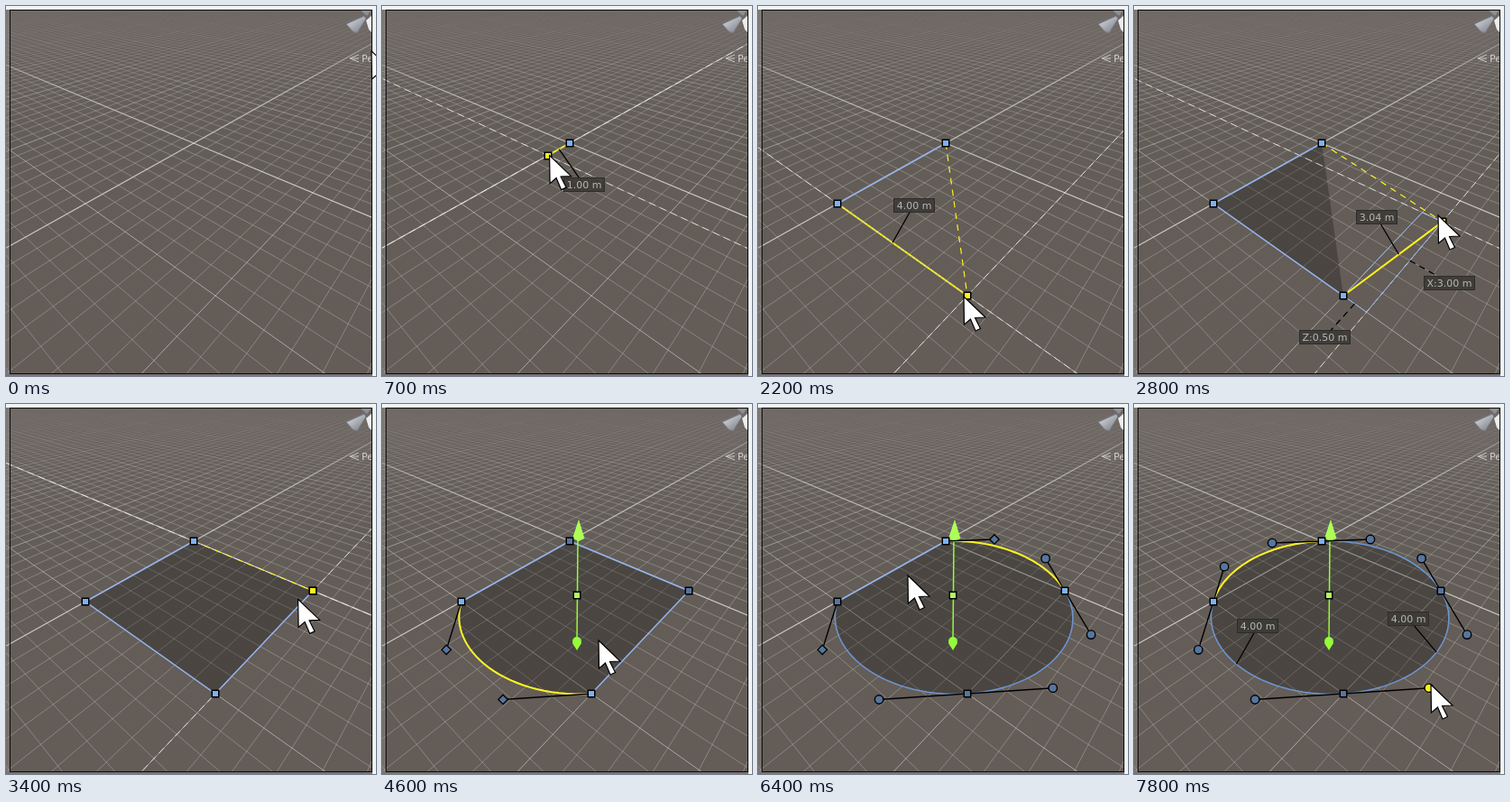
These frames come from a looping animation (410x410 px, 8 s). An HTML page with a canvas:

```html
<!DOCTYPE html>
<html lang="en">
<head>
<meta charset="utf-8">
<title>Drawing a disc on a grid</title>
<style>
html, body { margin: 0; width: 100%; height: 100%; overflow: hidden; background: #645d58; }
canvas { display: block; width: 100vw; height: 100vh; }
</style>
</head>
<body>
<canvas id="stage"></canvas>
<script>
const SIZE = 410, LOOP = 8000, STEP = 100;
const YELLOW = '#fff21c', BLUE = '#92b2ea', ARC = '#6c97d2', GREEN = '#94fb3a';
const BRIGHT = '#7db2f2', DIM = '#56759f', SHADE = 'rgba(0,0,0,.25)';
const FONT = '11px "DejaVu Sans", Verdana, sans-serif';

const canvas = document.getElementById('stage');
const ratio = Math.max(1, window.devicePixelRatio || 1);
canvas.width = canvas.height = SIZE * ratio;
let ctx = canvas.getContext('2d');

// Ground plane, in metres, to the screen and back.
const GX = .05873, GZ = .05053;
function project([x, z]) {
  const w = 1 - GX * x - GZ * z;
  return [(208 - 35.17 * x + 15.82 * z) / w, (152 + 3.89 * x + 3.293 * z) / w];
}
function unproject([px, py]) {
  const a = GX * px - 35.17, b = GZ * px + 15.82;
  const c = GX * py + 3.89, d = GZ * py + 3.293;
  const e = px - 208, f = py - 152, det = a * d - b * c;
  return [(e * d - b * f) / det, (a * f - e * c) / det];
}

const corners = [[0, 0], [4, 0], [4, 4], [0, 4]];
const placedAt = [300, 1600, 2300, 3400];
const closedAt = 3700, gizmoAt = 4600, dragAt = 7700;

// Edge i runs from corner i to the next; they are bent in turn, starting at edge 1.
const edges = corners.map((c, i) => {
  const select = 4400 + 800 * ((i + 3) % 4);
  return { hover: select - 300, select, bend: select + 200, end: i ? select + 800 : LOOP };
});

// Pointer: time of arrival, x, y.
const stops = [
  [0, 405, 50], [200, 209, 153], [900, 170, 174], [1400, 67, 221], [1600, 90, 219],
  [2200, 228, 322], [2800, 337, 232], [3200, 342, 208], [3800, 250, 250],
  [4100, 165, 270], [4600, 240, 262], [4900, 310, 240], [5500, 311, 202],
  [5800, 272, 180], [6400, 166, 190], [7800, 329, 311]
];
function pointerAt(t) {
  const n = stops.findIndex(s => s[0] >= t);
  if (n < 1) return stops[n].slice(1);
  const [t0, x0, y0] = stops[n - 1], [t1, x1, y1] = stops[n];
  const span = Math.min(500, t1 - t0), k = Math.max(0, 1 - (t1 - t) / span);
  return [x0 + (x1 - x0) * k, y0 + (y1 - y0) * k];
}
const snap = v => Math.round(v * 2) / 2;
const middle = (a, b) => [(a[0] + b[0]) / 2, (a[1] + b[1]) / 2];

function trace(points, close) {
  ctx.beginPath();
  points.forEach(p => ctx.lineTo(p[0], p[1]));
  if (close) ctx.closePath();
}
function line(points, color, width = 1, dash = []) {
  trace(points);
  ctx.setLineDash(dash);
  ctx.strokeStyle = color;
  ctx.lineWidth = width;
  ctx.stroke();
  ctx.setLineDash([]);
}
function paint(fill, outline, width) {
  ctx.fillStyle = fill;
  ctx.fill();
  if (!outline) return;
  ctx.strokeStyle = outline;
  ctx.lineWidth = width;
  ctx.stroke();
}
function area(points, fill, outline, width = 1) {
  trace(points, true);
  paint(fill, outline, width);
}
function disc([x, y], r, fill, outline, width = 1) {
  ctx.beginPath();
  ctx.arc(x, y, r, 0, 2 * Math.PI);
  paint(fill, outline, width);
}
function box(x, y, w, h, fill) {
  ctx.fillStyle = fill;
  ctx.fillRect(x, y, w, h);
}
function clipView() {
  ctx.save();
  ctx.beginPath();
  ctx.rect(0, 4, 405, 403);
  ctx.clip();
}
function fade(...marks) {
  const g = ctx.createLinearGradient(0, 0, 0, SIZE);
  marks.forEach(([y, c]) => g.addColorStop(y / SIZE, c));
  return g;
}

// A ground line at a fixed x or a fixed z, kept in front of the eye.
function groundLine(axis, k) {
  const near = axis ? (.68 - GZ * k) / GX : (.68 - GX * k) / GZ;
  const at = s => project(axis ? [s, k] : [k, s]);
  return [at(-150), at(near)];
}

function drawGrid() {
  box(0, 0, SIZE, SIZE, fade([0, '#69625e'], [150, '#635d58'], [410, '#645c57']));
  const tone = (far, mid, near) => fade([0, `rgba(205,204,202,${far})`],
    [90, `rgba(205,204,202,${mid})`], [210, `rgba(205,204,202,${near})`]);
  const ranks = [tone(.02, .27, .36), tone(.02, .4, .66), tone(.05, .8, 1)];
  ranks.forEach((color, pass) => {
    for (let i = -120; i <= 32; i++) {
      const rank = i === 0 ? 2 : i % 8 === 0 ? 1 : 0;
      if (rank !== pass) continue;
      for (const axis of [0, 1]) line(groundLine(axis, i / 2), color, rank > 1 ? 1.25 : 1);
    }
  });
}

function drawViewCone() {
  clipView();
  area([[392, 4], [405, 4], [400, 11]], '#8d9096');
  const g = ctx.createLinearGradient(380, 14, 392, 30);
  g.addColorStop(0, '#d3d5dc');
  g.addColorStop(1, '#83858e');
  area([[377, 20], [397, 11], [399, 14], [389, 30], [384, 28]], g, '#777982');
  area([[399, 16], [406, 10], [406, 30], [402, 26]], '#eceef0');
  for (const dy of [-4, 0, 4]) line([[381, 58], [391, 58 + dy]], '#c9c8c6');
  ctx.font = FONT;
  ctx.fillStyle = '#cfcecb';
  ctx.fillText('Persp', 394, 62);
  ctx.restore();
}

function drawFrame() {
  box(0, 0, 4, SIZE, 'rgba(150,150,150,.35)');
  box(0, 407, SIZE, 3, '#777674');
  box(0, 0, SIZE, 4, '#f1f6f6');
  box(406, 0, 4, SIZE, '#f1f4f5');
  ctx.strokeStyle = '#0b0b0b';
  ctx.lineWidth = 1;
  ctx.strokeRect(4.5, 4.5, 401, 403);
}

function label(text, from, to, dash) {
  line([from, to], '#000', 1.3, dash);
  ctx.font = FONT;
  const w = Math.round(ctx.measureText(text).width) + 7;
  const x = Math.round(to[0] - w / 2), y = Math.round(to[1] - 8);
  box(x, y, w, 16, 'rgba(60,58,55,.9)');
  ctx.strokeStyle = '#2e2c2a';
  ctx.lineWidth = 1;
  ctx.strokeRect(x + .5, y + .5, w - 1, 15);
  ctx.fillStyle = '#b9b7b3';
  ctx.textAlign = 'center';
  ctx.fillText(text, x + w / 2, y + 12);
}
const metres = v => Math.abs(v).toFixed(2) + ' m';

// Length label, set off square to the edge.
function lengthLabel(a, b, mid) {
  const p = project(a), q = project(b);
  let nx = q[1] - p[1], ny = p[0] - q[0];
  nx *= ny > 0 ? 1.25 : .8;
  const s = 48 / Math.hypot(nx, ny);
  label(metres(Math.hypot(b[0] - a[0], b[1] - a[1])), mid, [mid[0] + nx * s, mid[1] + ny * s]);
}
// Label for one axis, set off along the other.
function axisLabel(name, value, at, dir) {
  const p = project(at), q = project([at[0] + dir[0] * .1, at[1] + dir[1] * .1]);
  const s = 50 / Math.hypot(q[0] - p[0], q[1] - p[1]);
  label(name + ':' + metres(value), p,
    [p[0] + (q[0] - p[0]) * s, p[1] + (q[1] - p[1]) * s], [7, 5]);
}

function square([x, y], fill) {
  x = Math.round(x);
  y = Math.round(y);
  box(x - 4.5, y - 4.5, 9, 9, '#000');
  box(x - 3, y - 3, 6, 6, fill);
}
function knob([x, y], round, fill) {
  const r = 5.2;
  if (round) disc([x, y], 4.7, fill, '#000', 1.4);
  else area([[x, y - r], [x + r, y], [x, y + r], [x - r, y]], fill, '#000', 1.3);
}

function drawDrafting(t) {
  if (!t) return;
  const done = corners.filter((c, i) => t >= placedAt[i]);
  const last = done[done.length - 1];
  const now = done.length === 4 ? last : unproject(pointerAt(t)).map(snap);
  const tip = project(now), pts = done.map(project);

  if (pts.length > 2) area(pts, SHADE);
  for (const axis of [0, 1]) {
    line(groundLine(axis, now[axis]), 'rgba(235,235,230,.85)', 1, [8, 5]);
  }
  line(pts, BLUE, 1.5);
  if (done.length > 1) line([pts[0], tip], YELLOW, 1.2, [7, 6]);

  const dx = last ? now[0] - last[0] : 0, dz = last ? now[1] - last[1] : 0;
  if (dx || dz) {
    const start = project(last), skew = dx && dz;
    const [mx, mz] = middle(last, now);
    if (skew) {
      line([last, [now[0], last[1]], now, [last[0], now[1]], last].map(project), BLUE);
    }
    line([start, tip], YELLOW, 2);
    if (skew) {
      axisLabel('X', dx, [mx, Math.max(last[1], now[1])], [0, 1]);
      axisLabel('Z', dz, [Math.max(last[0], now[0]), mz], [1, 0]);
    } else {
      line([start, tip], BLUE, 1, [2, 3]);
    }
    lengthLabel(last, now, project([mx, mz]));
  }
  pts.forEach(p => square(p, BRIGHT));
  square(tip, YELLOW);
}

// Bezier controls that turn an edge into a quarter of the circle.
function controls(i) {
  const k = 1.1046, a = corners[i], b = corners[(i + 1) % 4];
  const ux = (b[0] - a[0]) / 4, uz = (b[1] - a[1]) / 4;
  return [
    [a[0] + k * (ux + uz), a[1] + k * (uz - ux)],
    [b[0] + k * (uz - ux), b[1] - k * (ux + uz)]
  ];
}
function edgePoints(i, curved) {
  const a = corners[i], d = corners[(i + 1) % 4];
  if (!curved) return [a, d].map(project);
  const [b, c] = controls(i), out = [];
  for (let n = 0; n <= 32; n++) {
    const s = n / 32, r = 1 - s;
    out.push(project([0, 1].map(j =>
      r * r * r * a[j] + 3 * r * r * s * b[j] + 3 * r * s * s * c[j] + s * s * s * d[j])));
  }
  return out;
}

function drawHeightGizmo() {
  line([[216, 264], [217, 150]], GREEN, 1.5);
  disc([216, 263], 5, GREEN);
  area([[211, 265], [221, 265], [216, 273]], GREEN);
  area([[218, 128], [224.5, 149], [218, 152], [211, 149]], '#adff58');
  square([216, 212], '#b0ff62');
}

function drawShape(t) {
  const bent = edges.map(e => t >= e.bend);
  const sides = edges.map((e, i) => edgePoints(i, bent[i]));
  const chosen = edges.findIndex(e => t >= e.select && t < e.end);
  const dragging = t >= dragAt;

  area(sides.flat(), SHADE);
  sides.forEach((s, i) => line(s, bent[i] ? ARC : BLUE, 1.5));
  sides.forEach((s, i) => {
    if (t >= edges[i].hover && t < edges[i].end) line(s, YELLOW, 2);
  });
  if (t >= gizmoAt) drawHeightGizmo();
  if (dragging) [1, 2].forEach(i => lengthLabel(corners[i], corners[i + 1], sides[i][16]));

  bent.forEach((on, i) => {
    if (!on) return;
    controls(i).forEach((c, end) => {
      const p = project(c), held = dragging && i === 2 && !end;
      line([project(corners[(i + end) % 4]), p], '#000', 1.4);
      knob(p, bent[(i + (end ? 1 : 3)) % 4], held ? YELLOW : DIM);
    });
  });
  corners.forEach((c, i) => {
    const lit = chosen >= 0 && (i === chosen || i === (chosen + 1) % 4);
    square(project(c), lit ? BRIGHT : DIM);
  });
}

const arrow = [[0, 0], [.5, 31], [7.5, 25], [13, 38], [18.5, 35.5], [12.5, 23.5], [24, 23]];
function drawPointer(t) {
  const [x, y] = pointerAt(t);
  area(arrow.map(p => [x + p[0], y + p[1]]), '#fff', '#000', 1.2);
}

// The grid never changes, so it is drawn once.
const backdrop = document.createElement('canvas');
backdrop.width = backdrop.height = canvas.width;
const screen2d = ctx;
ctx = backdrop.getContext('2d');
ctx.scale(ratio, ratio);
drawGrid();
drawViewCone();
drawFrame();
ctx = screen2d;
ctx.scale(ratio, ratio);

function draw(t) {
  ctx.drawImage(backdrop, 0, 0, SIZE, SIZE);
  clipView();
  (t < closedAt ? drawDrafting : drawShape)(t);
  ctx.restore();
  line([[4.5, 4], [4.5, 407]], '#0b0b0b');
  drawPointer(t);
}

const began = performance.now();
let shown = -1;
function tick() {
  const t = Math.floor(((performance.now() - began) % LOOP) / STEP) * STEP;
  if (t !== shown) draw(shown = Math.min(t, 7800));
  requestAnimationFrame(tick);
}
tick();
</script>
</body>
</html>
```
